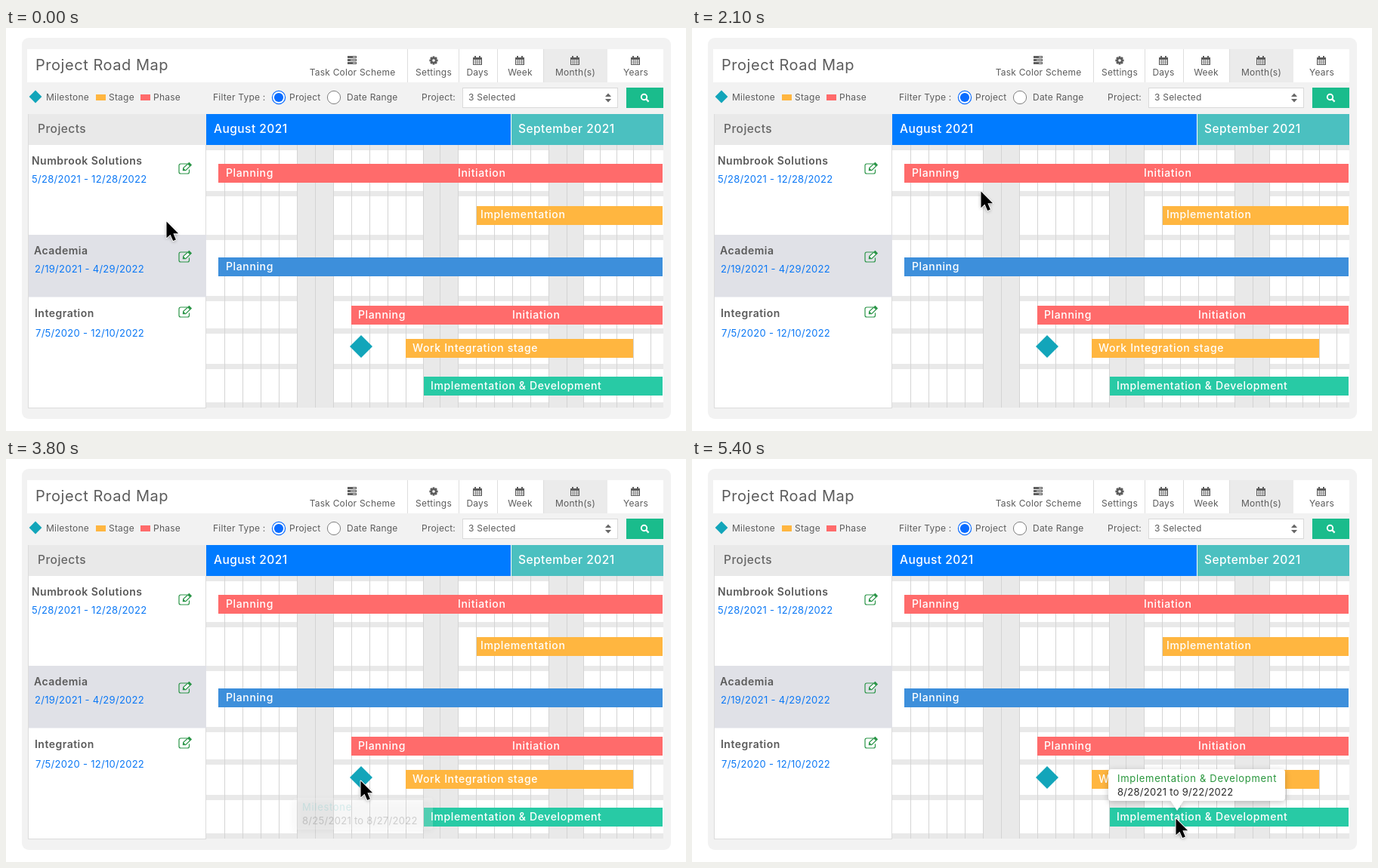
An HTML page with a canvas that plays this animation: 900x534 px, repeating every 7.4 s.

```html
<!DOCTYPE html>
<html lang="en">
<head>
<meta charset="utf-8">
<title>Project Road Map</title>
<style>
  html, body { margin: 0; width: 100%; height: 100%; overflow: hidden; background: #fff; }
  canvas { display: block; width: 900px; height: 534px; }
</style>
</head>
<body>
<canvas id="stage"></canvas>
<script>
const W = 900, H = 534, LOOP = 7400, STEP = 100;
const canvas = document.getElementById('stage');
const ctx = canvas.getContext('2d');
const dpr = window.devicePixelRatio || 1;
canvas.width = W * dpr;
canvas.height = H * dpr;

const RED = '#ff6b6b', ORANGE = '#ffb640', BLUE = '#007bff', TEAL = '#4bc0c0',
      MILE = '#12a5ba', GREEN = '#28caa5', EDIT = '#2b9548',
      BAND = '#e9e9e9', LINE = '#d4d4d4', INK = '#5c5c5c';

// [weight, size, tracking in em]
const TYPE = {
  title: [400, 20, .027],
  ui: [400, 12, .018],
  head: [500, 15.5, .03],
  name: [600, 14, .035],
  date: [400, 13, .022],
  bar: [500, 14, .045],
  tip: [400, 13, .054]
};

function text(str, x, y, type, color, align = 'left') {
  const [weight, size, track] = TYPE[type];
  ctx.font = `${weight} ${size}px Inter, "Open Sans", sans-serif`;
  ctx.letterSpacing = size * track + 'px';
  ctx.textAlign = align;
  ctx.fillStyle = color;
  ctx.fillText(str, x, y);
}

// Filled box given by its edges
function box(l, t, r, b, color) {
  ctx.fillStyle = color;
  ctx.fillRect(l, t, r - l, b - t);
}

function poly(points, color) {
  ctx.beginPath();
  points.forEach(([x, y]) => ctx.lineTo(x, y));
  ctx.closePath();
  ctx.fillStyle = color;
  ctx.fill();
}

function diamond(x, y, r) {
  poly([[x, y - r], [x + r, y], [x, y + r], [x - r, y]], MILE);
}

function disc(x, y, r, fill, stroke, width = 1) {
  ctx.beginPath();
  ctx.arc(x, y, r, 0, 7);
  ctx.fillStyle = fill;
  ctx.fill();
  if (!stroke) return;
  ctx.strokeStyle = stroke;
  ctx.lineWidth = width;
  ctx.stroke();
}

function at(x, y, draw) {
  ctx.save();
  ctx.translate(x, y);
  draw();
  ctx.restore();
}

function calendarIcon() {
  box(-6, -4, 6, 6, INK);
  box(-4, -6, -2, -3, INK);
  box(2, -6, 4, -3, INK);
  for (let r = 0; r < 3; r++)
    for (let c = 0; c < 4; c++)
      box(-5 + c * 2.6, -1 + r * 2.2, -3.1 + c * 2.6, .6 + r * 2.2, '#fff');
}

function gearIcon() {
  for (let i = 0; i < 4; i++) {
    box(-1.4, -5.6, 1.4, 5.6, INK);
    ctx.rotate(Math.PI / 4);
  }
  disc(0, 0, 4.2, INK);
  disc(0, 0, 1.8, '#fff');
}

function listIcon() {
  for (let y = -6; y <= 2; y += 4) {
    box(-6, y, 6, y + 3, INK);
    box(y === -2 ? -2 : 1, y + 1, 5, y + 2, '#ddd');
  }
}

function editIcon() {
  ctx.strokeStyle = EDIT;
  ctx.lineWidth = 1.2;
  ctx.beginPath();
  ctx.moveTo(3, -6);
  ctx.lineTo(-5.5, -6);
  ctx.arcTo(-8, -6, -8, -3, 2.3);
  ctx.arcTo(-8, 7, -5, 7, 2.3);
  ctx.arcTo(5.5, 7, 5.5, 4, 2.3);
  ctx.lineTo(5.5, 1.5);
  ctx.stroke();
  poly([[-2.6, 2.6], [-2.2, -.6], [5.4, -7.4], [8.2, -4.6], [.8, 2.6]], '#fff');
  ctx.stroke();
  poly([[-2.6, 2.6], [-2.2, -.6], [.8, 2.6]], EDIT);
  poly([[3.4, -5.6], [5.4, -7.4], [8.2, -4.6], [6.3, -2.7]], EDIT);
}

function drawHeader() {
  ctx.beginPath();
  ctx.roundRect(21, 13, 859, 505, 9);
  ctx.fillStyle = '#f2f2f2';
  ctx.fill();
  box(28, 28, 870, 72, '#fff');
  box(711, 28, 796, 72, '#ebebeb');
  for (const x of [531, 599, 650, 711]) box(x, 28, x + 1, 72, '#dedede');
  text('Project Road Map', 39, 56, 'title', INK);

  const tabs = [
    ['Task Color Scheme', 458.5, listIcon], ['Settings', 566, gearIcon], ['Days', 624, calendarIcon],
    ['Week', 680.5, calendarIcon], ['Month(s)', 753.5, calendarIcon], ['Years', 833.5, calendarIcon]
  ];
  for (const [label, x, icon] of tabs) {
    at(Math.round(x - .5), 43, icon);
    text(label, x, 63, 'ui', INK, 'center');
  }
}

function drawFilters() {
  diamond(39, 91, 8.4);
  box(119, 88, 132, 96, ORANGE);
  box(178, 88, 191, 96, RED);
  const labels = [['Milestone', 53], ['Stage', 136], ['Phase', 195], ['Filter Type :', 274],
                  ['Project', 375], ['Date Range', 451], ['Project:', 550]];
  for (const [label, x] of labels) text(label, x, 96, 'ui', INK);

  disc(361, 92, 8.6, '#fff', '#0a6cff', 1.2);
  disc(361, 92, 6.1, '#0a6cff');
  disc(434, 92, 8.6, '#fff', '#808080');

  box(604, 79, 810, 106, '#d9d9d9');
  box(605, 80, 809, 105, '#fff');
  text('3 Selected', 612, 96, 'ui', INK);
  poly([[793, 91], [797, 86.5], [801, 91]], '#666');
  poly([[793, 94], [797, 98.5], [801, 94]], '#666');

  box(821, 79, 870, 106, '#1abc8c');
  disc(844.5, 91.5, 3.7, 'transparent', '#fff', 1.9);
  ctx.beginPath();
  ctx.moveTo(847.3, 94.3);
  ctx.lineTo(850.6, 97.6);
  ctx.lineWidth = 2.2;
  ctx.stroke();
}

function drawProjects() {
  box(29, 114, 265, 504, '#dcdcdc');
  box(30, 114, 265, 155, BAND);
  text('Projects', 42, 139, 'head', '#666');
  box(30, 155, 264, 503, '#fff');
  box(30, 274, 265, 356.5, '#e0e1e7');
  const rows = [
    ['Numbrook Solutions', 34, 181, '5/28/2021 - 12/28/2022', 34, 205, 186],
    ['Academia', 37, 300, '2/19/2021 - 4/29/2022', 38, 324, 303],
    ['Integration', 38, 383, '7/5/2020 - 12/10/2022', 39, 409, 376]
  ];
  for (const [name, nx, ny, dates, dx, dy, iconY] of rows) {
    text(name, nx, ny, 'name', '#5a5a5a');
    text(dates, dx, dy, 'date', '#0b78f5');
    at(237, iconY, editIcon);
  }
}

function drawGrid() {
  box(265, 114, 668, 155, BLUE);
  box(668, 114, 669, 155, '#fff');
  box(669, 114, 870, 155, TEAL);
  text('August 2021', 275, 139, 'head', '#fff');
  text('September 2021', 678, 139, 'head', '#fff');

  box(265, 155, 870, 503, '#fff');
  for (const [l, r] of [[385, 433], [552, 598], [718, 764]]) box(l, 155, r, 503, BAND);
  for (const y of [155, 216, 274, 355, 398, 445, 496]) box(265, y, 870, y + 7, BAND);
  const lines = [552, 574, 853];
  for (let x = 289; x < 552; x += 24) lines.push(x);
  for (let x = 598; x < 740; x += 24) lines.push(x);
  for (let x = 742; x < 840; x += 22) lines.push(x);
  for (const x of lines) box(x, 155, x + 1, 503, LINE);

  const bars = [[281, 869, 180, RED], [623, 869, 236, ORANGE], [281, 869, 304, '#3d8fdb'],
                [457, 869, 368, RED], [529, 830, 412, ORANGE], [553, 869, 462, GREEN]];
  for (const [l, r, y, color] of bars) box(l, y, r, y + 25, color);
  diamond(470, 422, 15);

  const labels = [['Planning', 291, 197], ['Initiation', 598, 197], ['Implementation', 628, 252],
                  ['Planning', 291, 321], ['Planning', 466, 385], ['Initiation', 670, 385],
                  ['Work Integration stage', 538, 429], ['Implementation & Development', 562, 479]];
  for (const [label, x, y] of labels) text(label, x, y, 'bar', '#fff');
}

function drawTip({ x, y, w, arrow, down, title, color, dates }, alpha) {
  const base = down ? y + 42 : y;
  ctx.save();
  ctx.globalAlpha = alpha;
  ctx.beginPath();
  ctx.roundRect(x, y, w, 42, 4);
  ctx.moveTo(arrow - 8.5, base);
  ctx.lineTo(arrow, base + (down ? 13 : -13));
  ctx.lineTo(arrow + 8.5, base);
  ctx.save();
  ctx.shadowColor = 'rgba(0,0,0,.22)';
  ctx.shadowBlur = 8 * dpr;
  ctx.shadowOffsetY = 2 * dpr;
  ctx.fillStyle = '#fff';
  ctx.fill();
  ctx.restore();
  text(title, x + 12, y + 17, 'tip', color);
  text(dates, x + 12, y + 35, 'date', '#2b2b2b');
  ctx.restore();
}

function drawCursor([x, y]) {
  at(x + .5, y + .5, () => {
    const shape = [[0, 0], [0, 21.8], [5, 17.2], [8.7, 25.6], [12.4, 24], [8.9, 15.8], [15.6, 15.8]];
    ctx.save();
    ctx.shadowColor = 'rgba(0,0,0,.4)';
    ctx.shadowBlur = 4 * dpr;
    ctx.shadowOffsetY = 1.5 * dpr;
    poly(shape, '#000');
    ctx.restore();
    ctx.strokeStyle = '#fff';
    ctx.lineWidth = 1.8;
    ctx.lineJoin = 'round';
    ctx.stroke();
    poly(shape, '#000');
  });
}

// Each move: first step time, steps until arrival, target, optional bend, tooltip
const start = [212, 256];
const moves = [
  { t: 1000, n: 3, to: [312, 196], tip: { x: 270, y: 210, w: 172, arrow: 361,
      title: 'Planning', color: TEAL, dates: '8/10/2021 to 8/20/2022' } },
  { t: 2100, n: 4, to: [652, 256], via: [442, 239], tip: { x: 625, y: 272, w: 184, arrow: 716,
      title: 'Implementation', color: '#c08a3a', dates: '8/30/2021 to 9/22/2022' } },
  { t: 3300, n: 6, to: [469, 426], tip: { x: 380, y: 449, w: 185, arrow: 472,
      title: 'Milestone', color: TEAL, dates: '8/25/2021 to 8/27/2022' } },
  { t: 4700, n: 4, to: [640, 476], tip: { x: 551, y: 411, w: 234, arrow: 642, down: true,
      title: 'Implementation & Development', color: '#28963c', dates: '8/28/2021 to 9/22/2022' } }
];

function pose(time) {
  let i = moves.length - 1;
  while (i >= 0 && time < moves[i].t) i--;
  if (i < 0) return { pos: start, alpha: 0 };
  const { t, n, to, via, tip } = moves[i];
  const from = i ? moves[i - 1].to : start;
  const step = Math.floor((time - t) / STEP) + 1;
  const u = Math.min(1, step / n);
  const pos = from.map((a, k) => {
    const c = via ? via[k] : (a + to[k]) / 2;
    return (1 - u) ** 2 * a + 2 * u * (1 - u) * c + u * u * to[k];
  });
  const alpha = Math.max(0, Math.min(1, (step - n + 1) / 5));
  return { pos, alpha, tip };
}

let origin;
function frame(now) {
  origin ??= now;
  const { pos, alpha, tip } = pose((now - origin) % LOOP);
  ctx.setTransform(dpr, 0, 0, dpr, 0, 0);
  box(0, 0, W, H, '#fff');
  drawHeader();
  drawFilters();
  drawProjects();
  drawGrid();
  if (alpha) drawTip(tip, alpha);
  drawCursor(pos);
  requestAnimationFrame(frame);
}
requestAnimationFrame(frame);
</script>
</body>
</html>
```
